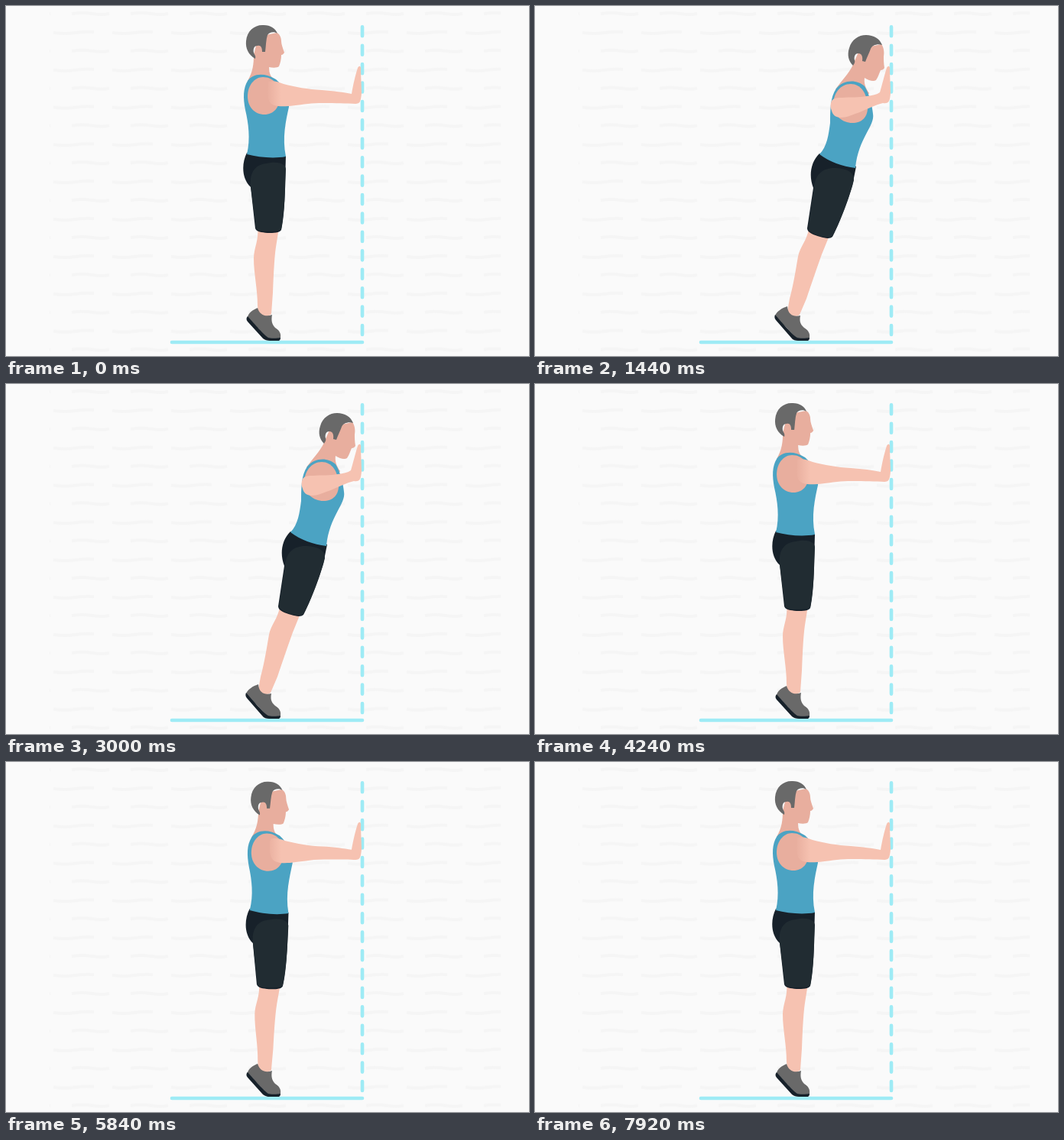
Animation of 684x458 px, one loop 7960 ms. Source, as an HTML page:

```html
<!DOCTYPE html>
<html lang="en">
<head>
<meta charset="utf-8">
<title>Wall push-up</title>
<style>
  html, body { margin: 0; width: 100%; height: 100%; overflow: hidden; background: #fafafa; }
  svg { display: block; width: 684px; height: 458px; }

  /* --a: arms straight, --b: leaning into the wall */
  .body path {
    d: var(--a);
    animation: push 1990ms infinite;
  }
  @keyframes push {
    0%, 12.5% { d: var(--a); animation-timing-function: ease-in-out; }
    37%, 73% { d: var(--b); animation-timing-function: ease-in-out; }
    98%, 100% { d: var(--a); }
  }

  .skin { fill: #f6c2b1; }
  .shade { fill: #e8ae9e; }
  .grey { fill: #696969; }
  .dark { fill: #17212a; }
  .shorts { fill: #212c32; }
  .tank { fill: #4ba3c3; }
  .line { fill: none; stroke: #9eebf5; stroke-width: 4.6; stroke-linecap: round; }
</style>
</head>
<body>
<svg viewBox="0 0 684 458">
  <defs>
    <pattern id="grain" x="60" y="6" width="77" height="48.84" patternUnits="userSpaceOnUse">
      <path d="M26 4 q14 -2 27 0 t22 0 M2 29 q16 2 29 0 t24 -1" fill="none" stroke="#f5f5f5" stroke-width="4"/>
    </pattern>
    <linearGradient id="arm" gradientUnits="userSpaceOnUse" x1="341" x2="360" y1="0" y2="0">
      <stop offset="0" stop-color="#e8ae9e"/>
      <stop offset="1" stop-color="#f6c2b1"/>
    </linearGradient>
  </defs>

  <rect width="684" height="458" fill="#fafafa"/>
  <rect x="57" y="4" width="590" height="454" fill="url(#grain)"/>

  <path class="line" d="M466 27.3V434" stroke-dasharray="12 12.42"/>
  <path class="line" d="M217 440H466"/>

  <g class="body">
    <path class="shade" style="
      --a:path('M324 64 C324 76 323 86 316 98 L322 112 L350 112 L352 97 C346 93 344 88 344 80 C349 81 355 81 357 79 C359 74 360 69 360 64 C362 64 363 62 364 61 C362 55 360 50 360 46 C360 40 357 36 354 35 L330 40 Z');
      --b:path('M417 74 C414 84 404 94 393 109 L396 122 L430 125 L437 114 C432 107 430 101 431 94 C437 98 443 99 446 97 C449 93 450 88 452 84 C454 84 456 83 457 81 C456 75 456 70 456 66 C457 60 456 54 453 50 L425 56 Z')"/>
    <path class="grey" style="
      --a:path('M326 69 C317 64 313 55 314 46 C315 32 326 24 337 25 C346 25 352 29 355 36 C351 33 344 34 342 38 C340 44 340 52 339 60 L335 60 C335 54 333 51 329 52 C324 52 323 57 324 61 C325 64 327 65 326 69 Z');
      --b:path('M416 78 C410 72 408 64 411 55 C414 44 423 38 433 38 C443 38 451 43 454 51 C448 49 441 51 439 56 C437 62 434 67 432 73 L428 72 C429 66 427 62 423 62 C418 62 417 67 418 71 C419 74 417 76 416 78 Z')"/>

    <!-- leg and shoe -->
    <path class="skin" style="
      --a:path('M329 290 C331 306 324 317 324 330 C324 350 329 370 329 392 L330 403 C336 407 343 407 347 403 L349 375 C350 350 351 325 354 309 L357 290 Z');
      --b:path('M358 292 C356 306 346 316 344 328 C341 345 338 365 333 383 L330 400 C334 407 342 407 346 404 L355 383 C362 362 369 342 375 325 L386 298 Z')"/>
    <path class="grey" style="
      --a:path('M329 395 C322 398 317 402 316 407 L341 434 C344 436 356 436 359 434 C360 428 357 424 352 421 C347 416 347 410 348 404 C340 407 332 405 329 395 Z');
      --b:path('M330 393 C323 395 316 400 314 405 L341 434 C344 436 356 436 359 434 C360 428 357 424 352 421 C346 416 346 411 347 405 C339 407 331 405 330 393 Z')"/>
    <path class="dark" style="
      --a:path('M316 406 C314 408 314 411 316 413 L336 435 C338 437 342 438 345 438 L357 438 C359 437 359 435 359 434 C355 435 345 435 343 434 C338 431 325 416 316 406 Z');
      --b:path('M314 404 C313 406 313 409 315 411 L335 434 C337 437 341 438 344 438 L357 438 C359 437 359 435 359 434 C355 435 345 435 343 434 C337 431 323 414 314 404 Z')"/>

    <!-- shorts -->
    <path class="dark" style="
      --a:path('M315 192 C308 206 308 226 320 237 L326 291 C328 296 334 296 342 297 C350 297 358 297 360 293 C364 275 365 245 365 230 L366 196 Z');
      --b:path('M372 193 C360 205 358 223 364 238 L356 291 C356 297 366 300 373 302 C379 304 386 305 389 302 C398 285 410 252 415 235 L420 210 Z')"/>
    <path class="shorts" style="
      --a:path('M320 236 C318 218 326 207 341 206 C355 203 365 206 366 213 C365 245 364 270 360 292 C357 295 350 295 342 295 C336 295 329 295 327 291 Z');
      --b:path('M365 238 C366 220 377 211 394 212 C408 213 417 217 417 228 C411 252 398 285 389 301 C386 303 380 303 373 301 C366 299 359 296 357 291 Z')"/>

    <!-- top, armhole and arm -->
    <path class="tank" style="
      --a:path('M316 98 C322 89 337 86 353 96 C363 105 370 118 370 132 C366 150 361 172 366 197 C350 200 330 198 315 194 C320 174 317 153 313 136 C310 120 310 108 316 98 Z');
      --b:path('M394 108 C404 96 421 96 431 105 C437 114 441 130 442 141 C445 157 423 172 419 212 C402 210 385 204 372 194 C382 184 384 168 386 153 C386 137 386 119 394 108 Z')"/>
    <path class="shade" style="
      --a:path('M336 93 C350 93 358 104 358 118 C358 133 350 142 338 142 C325 142 316 132 316 118 C316 104 325 93 336 93 Z');
      --b:path('M413 102 C426 102 434 114 435 130 C436 146 427 153 415 153 C402 153 391 144 390 129 C390 115 399 102 413 102 Z')"/>
    <path fill="url(#arm)" style="
      --a:path('M343 99 C349 97 355 99 363 102 C378 106 395 109 413 110 C428 111 442 113 452 115 C454 103 457 90 460 81 C462 77 465 78 464 85 L465 114 C464 125 463 128 457 128 C441 128 412 126 395 128 C378 130 367 132 356 131 C347 130 343 126 342 116 C342 109 342 103 343 99 Z');
      --b:path('M388 124 C391 120 396 120 402 120 C412 119 424 120 434 118 C441 117 447 116 451 113 C454 103 457 90 460 81 C462 77 465 78 464 85 L465 114 C464 125 463 128 455 127 C446 129 432 136 422 140 C413 143 407 146 400 146 C393 146 389 142 388 137 C386 133 386 128 388 124 Z')"/>
  </g>
</svg>
</body>
</html>
```
